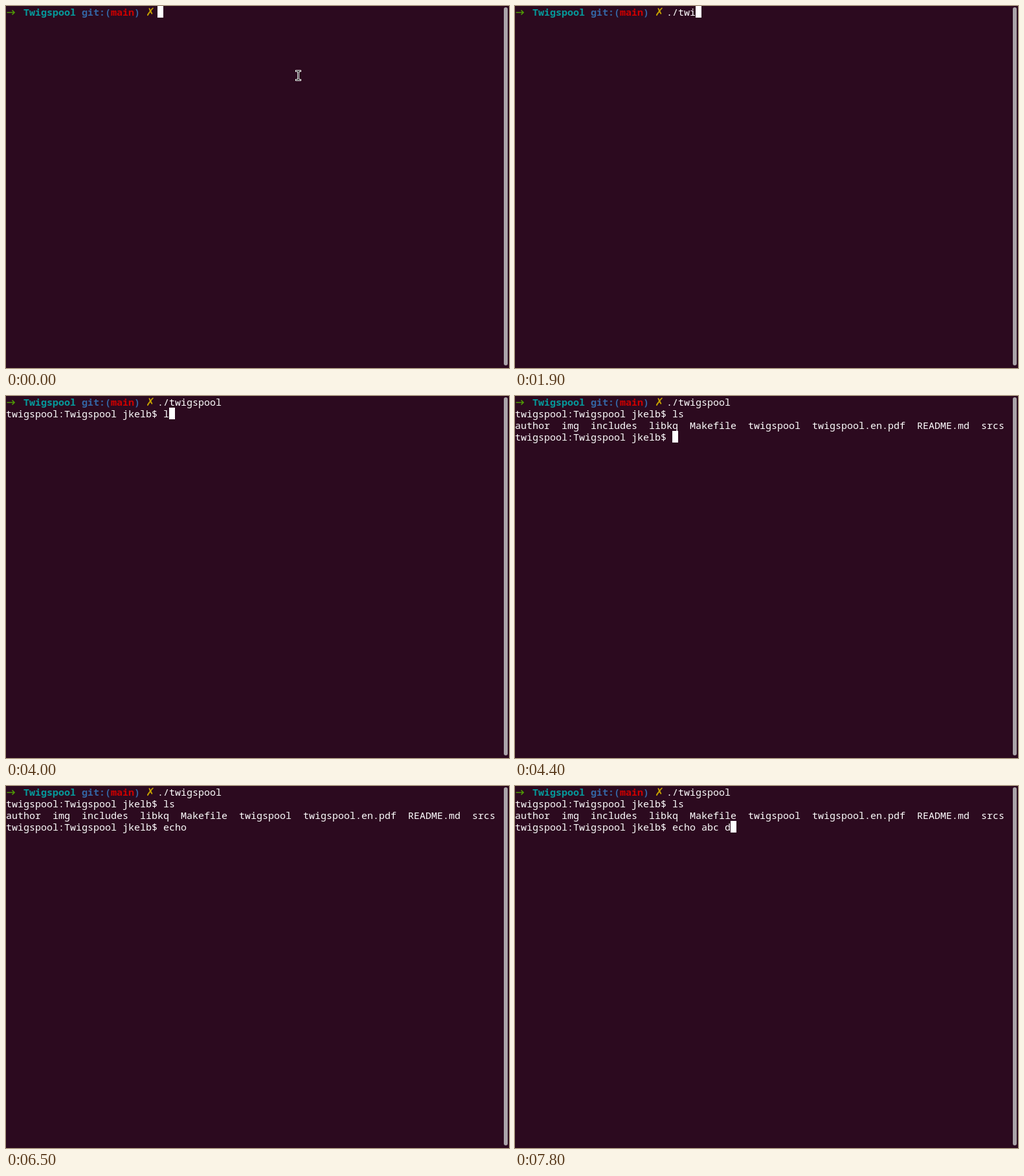
These frames come from a looping animation (777 by 560 pixels, 8 s). An HTML page with a canvas:

```html
<!DOCTYPE html>
<html lang="en">
<head>
<meta charset="utf-8">
<title>Terminal session</title>
<style>
  html, body { margin: 0; width: 100%; height: 100%; overflow: hidden; background: #2c0a1f; }
  canvas { display: block; }
</style>
</head>
<body>
<canvas id="stage" width="777" height="560"></canvas>
<script>
const ctx = document.getElementById('stage').getContext('2d');
const LOOP = 8000, CELL = 9, ROW = 18, BASELINE = 15;
const MONO = '15px "Noto Sans Mono", monospace';
const COLORS = {
  back: '#2c0a1f', text: '#ffffff', green: '#4e9a06', cyan: '#06989a',
  blue: '#3465a4', red: '#cc0000', yellow: '#c4a000', bar: '#aaa4a9'
};

const SHELL = 'twigspool';
const PROMPT = `${SHELL}:Twigspool jkelb$ `;
const LISTING = `author  img  includes  libkq  Makefile  ${SHELL}  ${SHELL}.en.pdf  README.md  srcs`;
const COMMAND_COL = 26;

// Each step: start time, row being typed on, text typed so far, cursor shown
const STEPS = [
  [0, 0, '', true],
  [400, 0, '', false],
  [700, 0, '', true],
  [1000, 0, '.', true],
  [1200, 0, './', true],
  [1600, 0, './' + SHELL.slice(0, 1), true],
  [1800, 0, './' + SHELL.slice(0, 2), true],
  [1900, 0, './' + SHELL.slice(0, 3), true],
  [2200, 0, `./${SHELL} `, true],
  [2700, 1, null, true],
  [3000, 1, '', true],
  [3300, 1, '', false],
  [3800, 1, '', true],
  [4000, 1, 'l', true],
  [4400, 3, '', true],
  [5000, 3, '', false],
  [5300, 3, '', true],
  [5500, 3, 'e', true],
  [5600, 3, 'ec', true],
  [5700, 3, 'echo', true],
  [5900, 3, 'echo ', true],
  [6500, 3, 'echo ', false],
  [6900, 3, 'echo ', true],
  [7000, 3, 'echo a', true],
  [7100, 3, 'echo ab', true],
  [7200, 3, 'echo abc', true],
  [7600, 3, 'echo abc ', true],
  [7800, 3, 'echo abc d', true]
];

function write(text, col, row, color = COLORS.text, bold = false) {
  ctx.font = (bold ? 'bold ' : '') + MONO;
  ctx.fillStyle = color;
  ctx.fillText(text, col * CELL, row * ROW + BASELINE);
}

function drawArrow() {
  ctx.strokeStyle = COLORS.green;
  ctx.lineWidth = 1.7;
  ctx.beginPath();
  ctx.moveTo(1.5, 10);
  ctx.lineTo(13, 10);
  ctx.moveTo(9.5, 6.5);
  ctx.lineTo(13, 10);
  ctx.lineTo(9.5, 13.5);
  ctx.stroke();
}

function drawGitPrompt() {
  drawArrow();
  write('Twigspool', 3, 0, COLORS.cyan, true);
  write('git:(', 13, 0, COLORS.blue, true);
  write('main', 18, 0, COLORS.red, true);
  write(')', 22, 0, COLORS.blue, true);
  ctx.font = '17px "DejaVu Sans", sans-serif';
  ctx.fillStyle = COLORS.yellow;
  ctx.fillText('✗', 216, BASELINE);
}

function drawPointer() {
  const beam = (color, width) => {
    ctx.strokeStyle = color;
    ctx.lineWidth = width;
    ctx.beginPath();
    ctx.moveTo(448.5, 100.5);
    ctx.lineTo(454.5, 100.5);
    ctx.moveTo(451.5, 100.5);
    ctx.lineTo(451.5, 114.5);
    ctx.moveTo(448.5, 114.5);
    ctx.lineTo(454.5, 114.5);
    ctx.stroke();
  };
  ctx.lineCap = 'square';
  beam('#ffffff', 3);
  beam('#000000', 1);
  ctx.lineCap = 'butt';
}

function drawScrollbar() {
  ctx.fillStyle = COLORS.bar;
  ctx.beginPath();
  ctx.roundRect(769, 2, 6, 554, 3);
  ctx.fill();
}

function draw(time) {
  const [, row, typed, cursor] = STEPS.findLast(step => step[0] <= time);
  ctx.fillStyle = COLORS.back;
  ctx.fillRect(0, 0, 777, 560);
  drawScrollbar();
  drawGitPrompt();

  if (row > 0) write('./' + SHELL, COMMAND_COL, 0);
  if (row > 1) {
    write(PROMPT + 'ls', 0, 1);
    write(LISTING, 0, 2);
  }

  let col = 0;
  if (typed !== null) {
    const start = row === 0 ? COMMAND_COL : PROMPT.length;
    if (row > 0) write(PROMPT, 0, row);
    write(typed, start, row);
    col = start + typed.length;
  }
  if (cursor) {
    ctx.fillStyle = COLORS.text;
    ctx.fillRect(col * CELL, row * ROW, CELL, ROW);
  }
  if (time < 700) drawPointer();
}

const begin = performance.now();
function tick() {
  draw((performance.now() - begin) % LOOP);
  requestAnimationFrame(tick);
}
tick();
</script>
</body>
</html>
```
